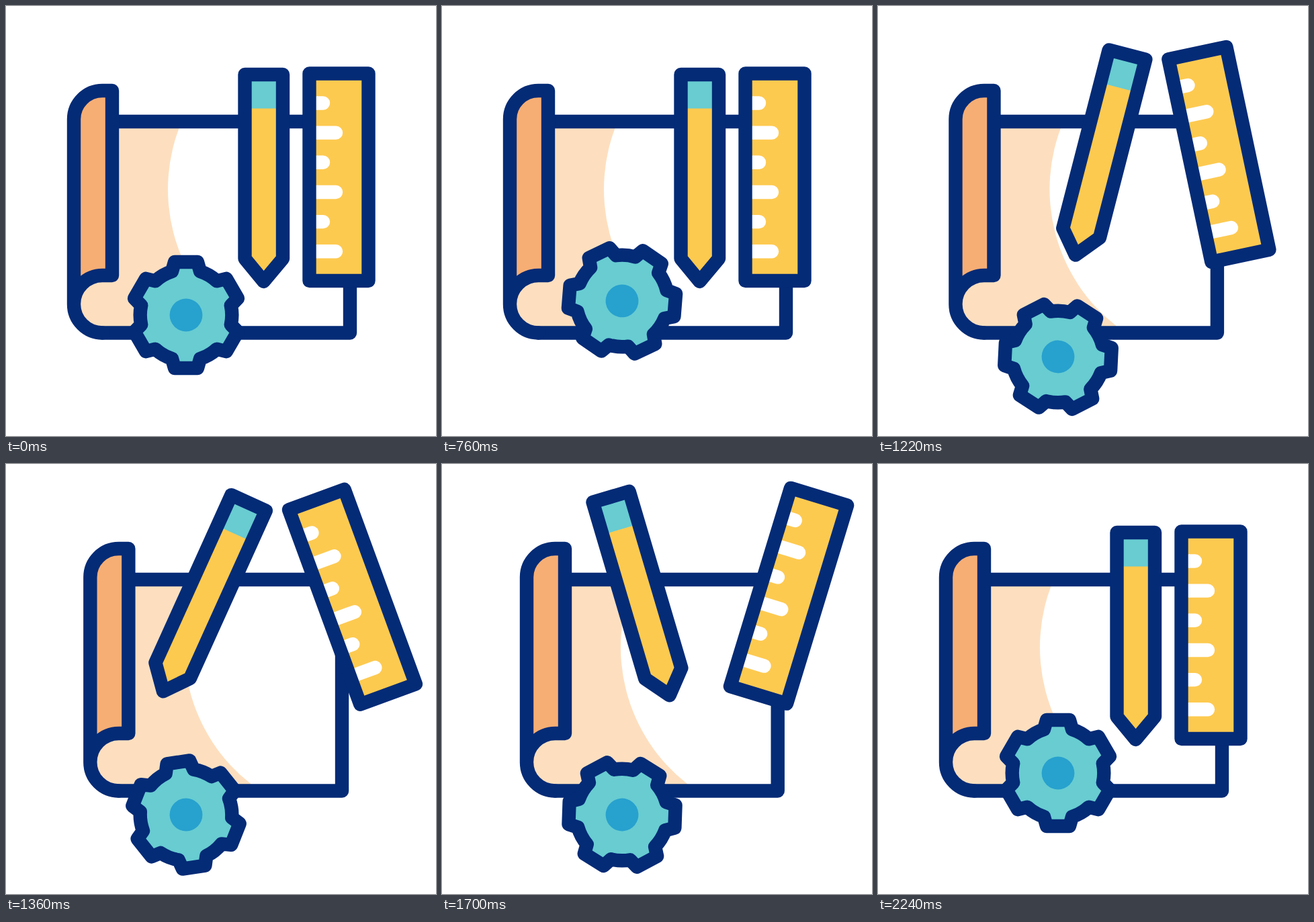
An HTML page for the animation above (2400 ms loop, 640 by 640 pixels).

```html
<!DOCTYPE html>
<html lang="en">
<head>
<meta charset="utf-8">
<title>Design tools</title>
<style>
  html, body { margin: 0; width: 100%; height: 100%; overflow: hidden; background: #fff; }
  svg { display: block; width: 100%; height: 100%; }
  .ink { stroke: #042b76; stroke-width: 20.4; stroke-linejoin: round; stroke-linecap: round; }
</style>
</head>
<body>
<svg viewBox="0 0 640 640" fill="none">
  <g id="roll">
    <path fill="#fddfbf" d="M158 172H261.5A258 258 0 0 0 340 476V486H143.5A42.5 42.5 0 0 1 143.5 401.5H158Z"/>
  </g>
  <path id="sheet" class="ink"/>
  <g id="curl">
    <path fill="#f7ae74" d="M158 126H143.5A42.5 42.5 0 0 0 101 168.5V444A42.5 42.5 0 0 1 143.5 401H158Z"/>
    <path class="ink" d="M143.5 486.5A42.5 42.5 0 0 1 101 444V168.5A42.5 42.5 0 0 1 143.5 126H158V401H143.5A42.5 42.5 0 0 0 101 444"/>
  </g>
  <g id="gear">
    <path id="cog" class="ink" fill="#68ccd1"/>
    <circle r="24.4" fill="#27a1ce"/>
  </g>
  <g id="ruler">
    <rect x="451.5" y="100.5" width="88" height="308.5" fill="#fdca50"/>
    <path id="marks" stroke="#fff" stroke-width="20.4" stroke-linecap="round"/>
    <rect class="ink" x="451.5" y="100.5" width="88" height="308.5"/>
  </g>
  <g id="pencil">
    <path fill="#fdca50" d="M355.5 102H412V376L383.5 410L355.5 376Z"/>
    <path fill="#68ccd1" d="M355.5 102H412V152.5H355.5Z"/>
    <path class="ink" d="M355.5 102H412V376L383.5 410L355.5 376Z"/>
  </g>
</svg>
<script>
const LOOP = 2400;
const $ = id => document.getElementById(id);
const place = (id, transform) => $(id).setAttribute('transform', transform);

// Eased value through [time, value] keys.
function track(t, ...keys) {
  if (t <= keys[0][0]) return keys[0][1];
  for (let i = 1; i < keys.length; i++) {
    const [t0, a] = keys[i - 1], [t1, b] = keys[i];
    if (t < t1) {
      const u = (t - t0) / (t1 - t0);
      return a + (b - a) * u * u * (3 - 2 * u);
    }
  }
  return keys[keys.length - 1][1];
}

function cogPath(teeth) {
  const tooth = [[-21, -65], [-17, -79], [17, -79], [21, -65]];
  let d = '';
  for (let i = 0; i < teeth; i++) {
    const a = i * 2 * Math.PI / teeth, c = Math.cos(a), s = Math.sin(a);
    tooth.forEach(([x, y], k) => {
      const join = k ? 'L' : i ? 'A68.3 68.3 0 0 1 ' : 'M';
      d += `${join}${x * c - y * s} ${x * s + y * c}`;
    });
  }
  return `${d}A68.3 68.3 0 0 1 ${tooth[0]}Z`;
}

$('cog').setAttribute('d', cogPath(6));
$('marks').setAttribute('d', Array.from({ length: 6 },
  (_, i) => `M452 ${144.5 + i * 44.15}H${i % 2 ? 491 : 472}`).join(''));

function swing(id, cx, cy, dx, dy, lift, angle) {
  place(id, `translate(${dx * lift} ${dy * lift}) rotate(${angle} ${cx} ${cy})`);
}

function draw(t) {
  const gearY = track(t, [200, 460], [800, 438.7], [1000, 522], [2000, 522], [2200, 460]);
  const spin = track(t, [200, 0], [2200, 180]);
  place('gear', `translate(268 ${gearY}) rotate(${spin})`);

  const squeeze = track(t, [1000, 0], [1400, 1], [2000, 1], [2200, 0]);
  const shift = 25 * squeeze;
  place('roll', `translate(${shift})`);
  place('curl', `translate(${shift})`);
  $('sheet').setAttribute('d',
    `M${158 + shift} 172H${512 - 12.3 * squeeze}V486.5H${143.5 + shift}`);

  const lift = track(t, [1000, 0], [1400, 1], [1800, 1], [2200, 0]);
  const tilt = (first, second) =>
    track(t, [1000, 0], [1400, first], [1800, second], [2200, 0]);
  swing('pencil', 383.7, 256, -88.5, -59.5, lift, tilt(25, -24));
  swing('ruler', 495.5, 254.75, 20.5, -58.5, lift, tilt(-20.7, 23.8));
}

const start = performance.now();
function tick() {
  draw((performance.now() - start) % LOOP);
  requestAnimationFrame(tick);
}
draw(0);
requestAnimationFrame(tick);
</script>
</body>
</html>
```
